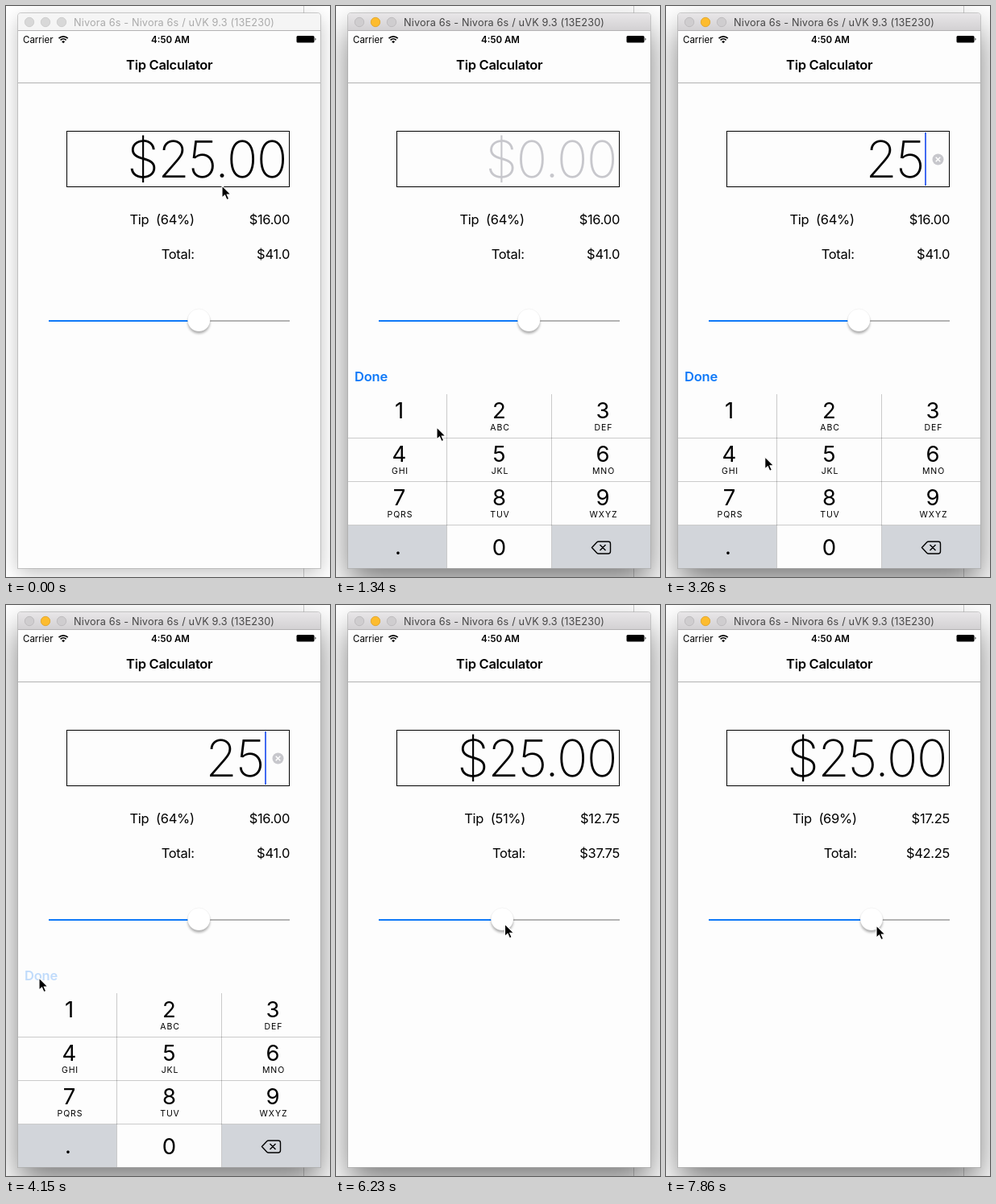
An HTML page that plays this animation: 402 by 709 pixels, repeating every 8000 ms.

```html
<!DOCTYPE html>
<html lang="en">
<head>
<meta charset="utf-8">
<title>Tip Calculator</title>
<style>
  html, body { margin: 0; width: 100%; height: 100%; overflow: hidden; background: #fff; }
  svg { display: block; width: 402px; height: 709px; }
  text { font-family: Inter, "Liberation Sans", sans-serif; white-space: pre; }
</style>
</head>
<body>
<svg id="stage" viewBox="0 0 402 709">
  <defs>
    <clipPath id="screen"><rect x="15" y="31" width="375" height="667"/></clipPath>
    <linearGradient id="bar" x2="0" y2="1">
      <stop offset="0" stop-color="#e8e6e8"/><stop offset="1" stop-color="#d2d0d2"/>
    </linearGradient>
    <filter id="far" x="-30%" y="-30%" width="160%" height="160%"><feGaussianBlur stdDeviation="20"/></filter>
    <filter id="near" x="-30%" y="-30%" width="160%" height="160%"><feGaussianBlur stdDeviation="12"/></filter>
    <filter id="soft" x="-50%" y="-50%" width="200%" height="200%"><feGaussianBlur stdDeviation="1.6"/></filter>
  </defs>
  <rect width="402" height="709" fill="#fff"/>
  <path d="M369.5 0V709" stroke="#ccc"/>
  <rect id="shadowOn" x="15" y="29" width="375" height="687" fill="#000" opacity=".52" filter="url(#far)"/>
  <rect id="shadowOff" x="15" y="17" width="375" height="687" fill="#000" opacity=".25" filter="url(#near)"/>
  <path d="M14.5 698.5V13q0-4.5 4.500-4.500H386q4.500 0 4.500 4.500V698.500Z" fill="#fdfdfd" stroke="#000" stroke-opacity=".2"/>
  <path id="titleBar" d="M15 31V13q0-4 4-4H386q4 0 4 4V31Z"/>
  <path d="M15 30.500H390" stroke="#b4b2b4"/>
  <g id="lights" stroke-width=".8"></g>
  <text id="title" x="84" y="25" font-size="12.7" letter-spacing=".15">Nivora 6s - Nivora 6s / uVK 9.3 (13E230)</text>

  <g id="status"></g>
  <path d="M65.500 40.200a8 8 0 0 1 11.200 0M67.600 42.400a5 5 0 0 1 7 0" fill="none" stroke="#000" stroke-width="1.7"/>
  <path d="M71.100 46.300l-2-2.100a2.900 2.900 0 0 1 4 0Z"/>
  <rect x="360.500" y="37" width="22" height="8.500" rx="1.500"/>
  <path d="M383.500 39.500q2 1.700 0 3.500Z"/>
  <path d="M15 95.500H390" stroke="#b2b2b2"/>

  <rect x="75.500" y="155.500" width="276" height="69" fill="none" stroke="#000"/>
  <g id="form"></g>
  <g id="clear">
    <circle cx="337.500" cy="190.500" r="7" fill="#c7c7cc"/>
    <path d="M334.700 187.700l5.600 5.600m0-5.600l-5.600 5.600" stroke="#fff" stroke-width="1.4"/>
  </g>
  <rect id="caret" y="157" width="2" height="66" fill="#426bf2"/>

  <path d="M53 391H352" stroke="#b3b3b3" stroke-width="2"/>
  <path id="fill" stroke="#0f79f8" stroke-width="2"/>
  <g id="thumb">
    <circle cy="393" r="13.800" opacity=".3" filter="url(#soft)"/>
    <circle cy="390" r="14" fill="#fff" stroke="#000" stroke-opacity=".08" stroke-width=".6"/>
  </g>

  <g clip-path="url(#screen)"><g id="keyboard">
    <rect x="15" y="441" width="375" height="257" fill="#fdfdfd"/>
    <path d="M15 645H137V698H15ZM268 645H390V698H268Z" fill="#d2d5da"/>
    <path d="M137.500 482V698M267.500 482V698M15 536.500H390M15 590.500H390M15 644.500H390" stroke="#000" stroke-opacity=".2"/>
    <g id="keys"></g>
    <path d="M317.500 672.500l6-6.500q1-1 2.300-1h12q2.700 0 2.700 2.700v9.600q0 2.700-2.700 2.700h-12q-1.300 0-2.300-1ZM327.500 669l7 7m0-7l-7 7" fill="none" stroke="#000" stroke-width="1.4"/>
  </g></g>

  <path id="pointer" d="M0 0V15.200L3.500 12L6 17.600L8.700 16.400L6.200 11H11Z" fill="#000" stroke="#fff" stroke-width="1.1"/>
</svg>
<script>
const $ = id => document.getElementById(id);
const NS = 'http://www.w3.org/2000/svg';

const set = (el, attrs) => { for (const key in attrs) el.setAttribute(key, attrs[key]); };
const show = (el, on) => set(el, { visibility: on ? 'visible' : 'hidden' });

function add(parent, tag, attrs, content = '') {
  const el = document.createElementNS(NS, tag);
  set(el, attrs);
  el.textContent = content;
  $(parent).appendChild(el);
  return el;
}

function label(parent, content, x, y, size, weight = 400, anchor = 'start', spacing = 0, fill = '#000') {
  return add(parent, 'text', { x, y, fill, 'font-size': size, 'font-weight': weight,
    'text-anchor': anchor, 'letter-spacing': spacing }, content);
}

const lights = [29, 49, 69].map(cx => add('lights', 'circle', { cx, cy: 20, r: 5.7 }));
label('status', 'Carrier', 21, 45.5, 11.5);
label('status', '4:50 AM', 204, 45.5, 11.5, 600, 'middle');
label('status', 'Tip Calculator', 202.7, 79, 16.5, 600, 'middle', -.3);

const formText = (content, y) => label('form', content, 352, y, 16.5, 400, 'end', -.3);
const amount = label('form', '', 348, 213, 63.5, 160, 'end', -1.3);
const tipName = formText('', 271), tipValue = formText('', 271);
const totalName = formText('Total:', 313.5), totalValue = formText('', 313.5);

const done = label('keys', 'Done', 23, 466, 16.5, 600, 'start', -.2, '#0f79f8');
const columns = [78.5, 202.5, 331];
const keyText = (content, x, y) => label('keys', content, x, y, 27.5, 400, 'middle');
['', 'ABC', 'DEF', 'GHI', 'JKL', 'MNO', 'PQRS', 'TUV', 'WXYZ'].forEach((name, i) => {
  const x = columns[i % 3], y = 512 + 54 * Math.floor(i / 3);
  keyText(i + 1, x, y);
  label('keys', name, x + 1, y + 15, 10.5, 400, 'middle', .9);
});
keyText('0', columns[1], 682);
keyText('.', 77, 681);

const LOOP = 8000, STEP = 148.2, LAST = 53;
const DRAG = 35;
const thumbTurns = [[DRAG, 239.3], [39.9, 120], [44, 286], [49, 111], [LAST, 255]];
const pointerStops = [[4, 268, 223], [9, 125, 523], [11, 104, 529], [14, 199, 506],
  [18, 197, 554], [20.5, 150, 592], [25, 41, 463], [30, 41, 463], [DRAG, 236, 392]];
const keyboardStops = [[3, 260], [6, 0], [29, 0], [32, 260]];

const ease = u => (1 - Math.cos(Math.PI * u)) / 2;

function along(stops, k) {
  const i = stops.findIndex(stop => stop[0] > k);
  const [t1, ...to] = stops.at(i);
  if (i <= 0) return to;
  const [t0, ...from] = stops[i - 1];
  const u = ease((k - t0) / (t1 - t0));
  return from.map((v, j) => v + (to[j] - v) * u);
}

function pointerAt(k, thumb) {
  if (k < DRAG) return along(pointerStops, k);
  const u = Math.min(1, (k - DRAG) / 10);
  return [thumb - 3 + 9 * u, 392 + 6 * u];
}

function drawWindow(active) {
  show($('shadowOn'), active);
  show($('shadowOff'), !active);
  set($('titleBar'), { fill: active ? 'url(#bar)' : '#f5f5f5' });
  set($('title'), { fill: active ? '#454545' : '#aaa' });
  lights.forEach((dot, i) => set(dot, active && i === 1
    ? { fill: '#fdbc2e', stroke: '#dfa023' }
    : { fill: active ? '#cfcdcf' : '#d8d8d8', stroke: active ? '#b9b7b9' : '#c8c8c8' }));
}

function drawField(k) {
  const editing = k >= 4 && k < 30;
  const typed = !editing ? '$25.00' : k < 14 ? '' : k < 19 ? '2' : '25';
  const filled = editing && typed;
  amount.textContent = typed || '$0.00';
  set(amount, { x: filled ? 320 : 348, fill: typed ? '#000' : '#c7c7cc' });
  show($('clear'), filled);
  set($('caret'), { x: filled ? 321 : 348 });
  show($('caret'), editing && (k + 2) % 7 < 4);
}

function drawForm(x) {
  const percent = Math.round((x - 67) / 271 * 100);
  const tip = 25 * percent / 100, total = 25 + tip;
  tipName.textContent = `Tip  (${percent}%)`;
  tipValue.textContent = '$' + tip.toFixed(2);
  totalValue.textContent = '$' + (Number.isInteger(total) ? total.toFixed(1) : total);
  const edge = 352 - 68 - tipValue.getComputedTextLength();
  set(tipName, { x: edge });
  set(totalName, { x: edge });
  set($('thumb'), { transform: `translate(${x})` });
  set($('fill'), { d: `M53 391H${x}` });
}

function draw(time) {
  const k = Math.min(LAST, Math.floor((time % LOOP + 8) / STEP));
  const [thumb] = along(thumbTurns, k);
  drawWindow(k >= 2);
  drawField(k);
  drawForm(thumb);
  set($('keyboard'), { transform: `translate(0 ${along(keyboardStops, k)})` });
  set(done, { opacity: k === 28 || k === 29 ? .25 : 1 });
  set($('pointer'), { transform: `translate(${pointerAt(k, thumb)})` });
}

const start = performance.now();
function tick(now) {
  draw(Math.max(0, now - start));
  requestAnimationFrame(tick);
}
draw(0);
requestAnimationFrame(tick);
</script>
</body>
</html>
```
